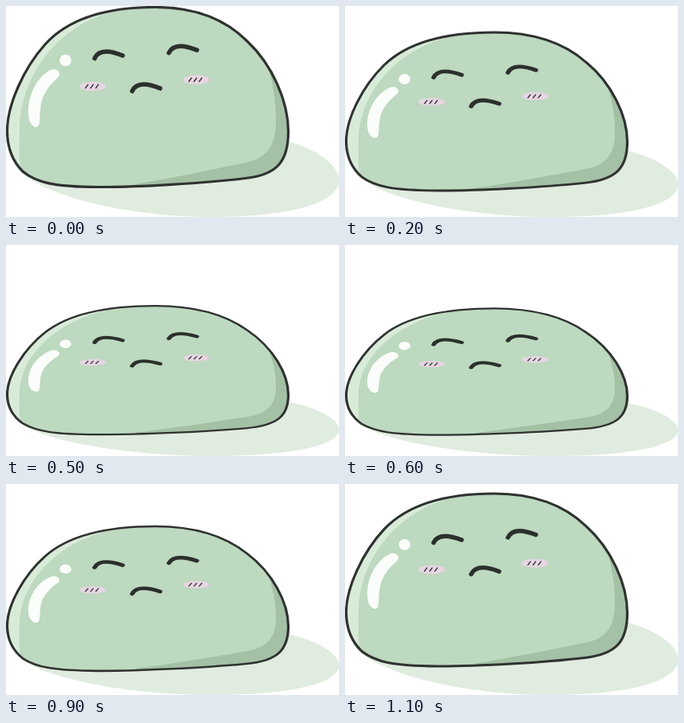
Recreate the animation shown at these times as an HTML page. Size 417x264 px, loop 1200 ms.

```html
<!DOCTYPE html>
<html lang="en">
<head>
<meta charset="utf-8">
<title>Squashing slime</title>
<style>
  html, body { margin: 0; width: 100%; height: 100%; overflow: hidden; background: #fff; }
  svg { display: block; width: 417px; height: 264px; }
</style>
</head>
<body>
<svg viewBox="0 0 417 264">
  <defs>
    <path id="body" d="M187 1.500C234 1.500 272 14 302 44C334 74 353.500 120 353.500 157C353.500 194 340 211 300 215.500C250 221.500 165 226.800 115 226.500C60 226 38 221 21 207C8 194 1.500 176 1.500 156C1.500 124 22 78 49 48C78 16 125 1.500 187 1.500Z"/>
    <clipPath id="inside"><use href="#body"/></clipPath>
    <path id="arc" d="M111 65.500C116 54.500 130 55.500 146 62" fill="none" stroke="#2b302c" stroke-width="5.600" stroke-linecap="round"/>
    <g id="blush">
      <ellipse rx="16.500" ry="5.700" fill="#e7d5e4"/>
      <path d="M-9 2.200l3.200-4.400M-2.500 2.200l3.200-4.400M4 2.200l3.200-4.400" stroke="#2b302c" stroke-width="1.400" stroke-linecap="round"/>
    </g>
  </defs>
  <g id="slime">
    <path fill="#e0ecdf" d="M10 198C34 236 150 264 258 264C350 264 417 248 417 218C417 200 392 180 352 169L200 150Z"/>
    <g clip-path="url(#inside)">
      <rect width="417" height="264" fill="#bdd9bf"/>
      <path fill="#d8ebd8" d="M0 0H150L130 8C64 26 16 90 17 158Q16 185 18 205L0 210Z"/>
      <path fill="#a4c0a5" d="M326 72C335 94 338.500 125 338 147C337 175 327 190 302 195.500C262 204 210 215 162 223V240H370V72Z"/>
    </g>
    <use href="#body" fill="none" stroke="#2f3230" stroke-width="3.200"/>
    <g fill="#fafdfa">
      <circle cx="74.500" cy="68" r="7.300"/>
      <path d="M57 79.500C64 77 70 84 65.500 89C56 97 47 108 44 122C42 132 43 140 41.500 148C40 154 33 152 30 145C23 125 34 90 57 79.500Z"/>
    </g>
    <use href="#arc"/>
    <use href="#arc" x="93" y="-6.800"/>
    <use href="#arc" x="47" y="41"/>
    <use href="#blush" x="108.500" y="100.500"/>
    <use href="#blush" x="238" y="92.300"/>
  </g>
</svg>
<script>
  const slime = document.getElementById("slime");
  const FLOOR = 264, STEP = 100, STEPS = 12;
  // Heights on the way down; the way up mirrors them.
  const heights = [1, 0.96, 0.88, 0.804, 0.747, 0.716, 0.703];

  function draw(ms) {
    const step = Math.floor(ms / STEP) % STEPS;
    const height = heights[Math.min(step, STEPS - step)];
    slime.setAttribute("transform", `translate(0 ${FLOOR * (1 - height)}) scale(1 ${height})`);
  }

  const start = performance.now();
  function tick() {
    draw(performance.now() - start);
    requestAnimationFrame(tick);
  }
  tick();
</script>
</body>
</html>
```
